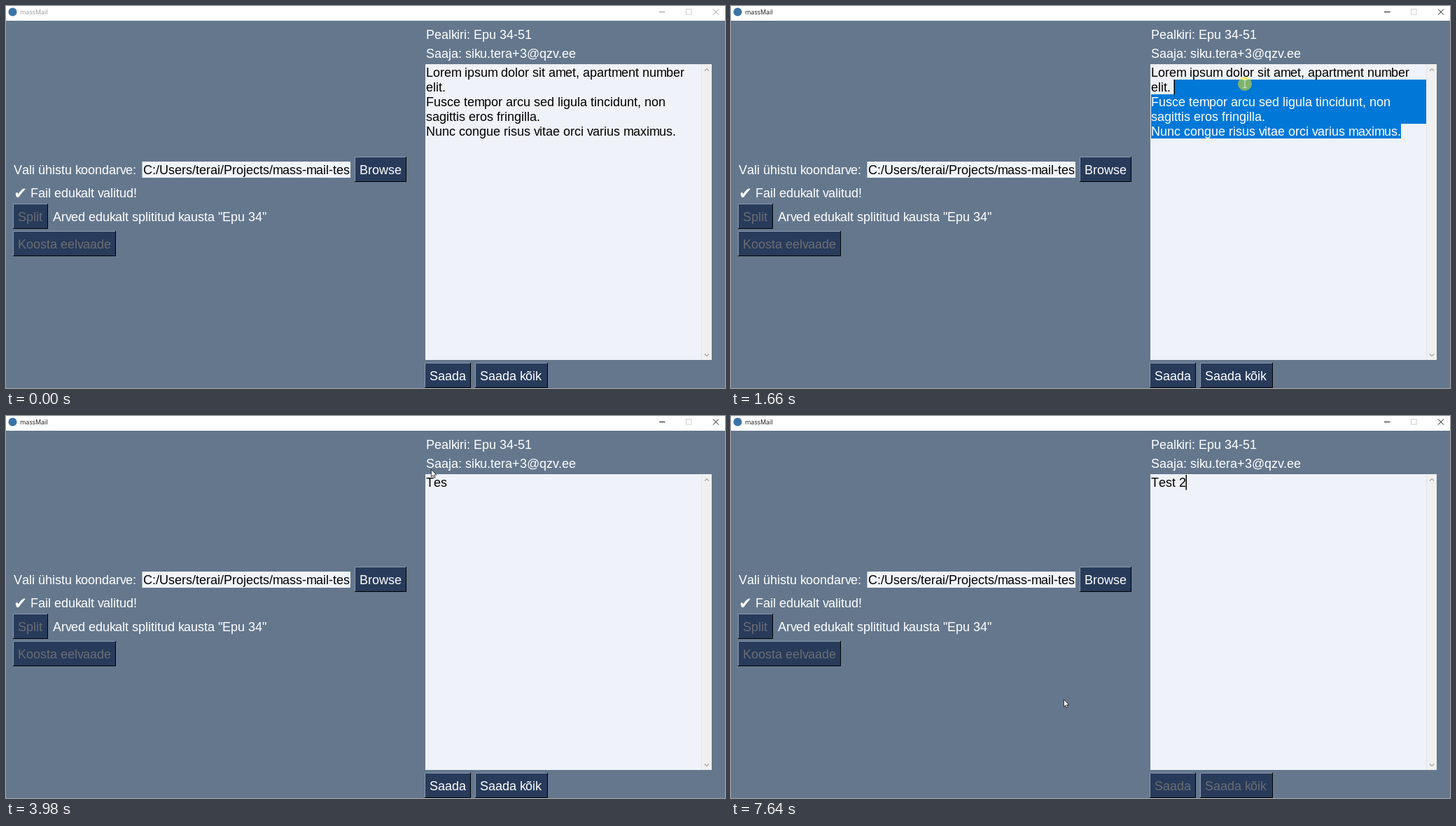
These frames come from a looping animation (1027x545 px, 8000 ms). An HTML page:

```html
<!DOCTYPE html>
<html lang="et">
<head>
<meta charset="utf-8">
<title>massMail</title>
<style>
  html, body { margin: 0; width: 100%; height: 100%; overflow: hidden; background: #64778d; }
  svg { display: block; }
  text { font: 18px "Liberation Sans", Arial, sans-serif; font-kerning: none; white-space: pre; fill: #fff; }
  .dark text, text.dark { fill: #000; }
  .dark .picked { fill: #fff; }
  .off text { fill: #6b6d72; }
  .title { font: 9px "Open Sans", sans-serif; }
  .tick { font: 23px "DejaVu Sans", sans-serif; }
  .sunk .hi { stroke: #000; }
  .sunk .lo { stroke: #8c9ab0; }
  path { fill: none; }
</style>
</head>
<body>
<svg id="stage" width="1027" height="545" viewBox="0 0 1027 545">
  <rect width="1027" height="545" fill="#64778d"/>
  <rect width="1027" height="21" fill="#fff"/>
  <circle cx="9.5" cy="8.5" r="6" fill="#3b73a6"/>
  <text id="title" class="title" x="20" y="12">massMail</text>
  <path id="minimize" d="M933 8.5h8.5"/>
  <rect x="971.5" y="4.5" width="7.5" height="7.5" fill="none" stroke="#d0d0d0"/>
  <path id="close" d="M1010 4.5l8 8m0-8l-8 8"/>

  <text x="11" y="239.5">Vali ühistu koondarve:</text>
  <rect x="194.5" y="222" width="297.5" height="23" fill="#f0f3f8"/>
  <text class="dark" x="196" y="239.5">C:/Users/terai/Projects/mass-mail-tes</text>
  <text class="tick" x="11" y="275">✔</text>
  <text x="35" y="273">Fail edukalt valitud!</text>
  <text x="67" y="306.5">Arved edukalt splititud kausta "Epu 34"</text>
  <text x="600" y="46.5">Pealkiri: Epu 34-51</text>
  <text x="600" y="74">Saaja: siku.tera+3@qzv.ee</text>
  <g id="buttons"></g>

  <rect x="599" y="83" width="409" height="422" fill="#eff2f8"/>
  <rect x="993" y="83" width="15" height="422" fill="#f0f0f0"/>
  <path d="M993.5 83v422" stroke="#e2e4e8"/>
  <path d="M998 92.5l3-3 3 3M998 496.5l3 3 3-3" stroke="#a3a3a3" stroke-width="1.2"/>
  <g id="marks" fill="#0078d7" shape-rendering="crispEdges"></g>
  <g id="lines" class="dark"></g>
  <rect id="caret" width="1.5" height="21.5"/>

  <g id="pointer">
    <circle id="press" r="10" fill="#ffee00" fill-opacity=".5"/>
    <path id="beam" d="M-2.5 -5.5h2l.5 .5.5-.5h2M0 -5v10M-2.5 5.5h2l.5-.5.5.5h2"/>
    <path id="arrow" d="M.4 .4v10.4l2.4-2.2 1.7 3.7 1.7-.8-1.7-3.5h3.4z"
          style="fill:#fff" stroke="#111" stroke-width=".8"/>
  </g>
</svg>
<script>
const LOOP = 8000, LEFT = 600, TOP = 84, LINE = 21, RIGHT = 993;
const $ = id => document.getElementById(id);
const show = (el, on) => el.setAttribute('visibility', on ? 'visible' : 'hidden');

function place(el, attrs) {
  for (const k in attrs) el.setAttribute(k, attrs[k]);
}

const LETTER = [
  'Lorem ipsum dolor sit amet, apartment number',
  'elit. ',
  'Fusce tempor arcu sed ligula tincidunt, non',
  'sagittis eros fringilla.',
  'Nunc congue risus vitae orci varius maximus.'
];

// Hinted type: every letter advances by whole pixels, and m, k, v are set tight.
const pen = document.createElement('canvas').getContext('2d');
pen.font = '180px "Liberation Sans", Arial, sans-serif';
const advance = ch => Math.round(pen.measureText(ch).width / 10) - /[mkv]/.test(ch);
const textEnd = (str, x = LEFT) => [...str].reduce((sum, ch) => sum + advance(ch), x);

function spaceOut(el, x) {
  const str = el.textContent;
  place(el, { x: [...str].map((_, i) => textEnd(str.slice(0, i), x)).join(' ') });
}

// label, x, y, width
const BUTTONS = [
  ['Browse', 498, 215, 74], ['Split', 10, 282, 50], ['Koosta eelvaade', 10, 321, 147],
  ['Saada', 598, 509, 66], ['Saada kõik', 670, 509, 104]
];
$('buttons').innerHTML = BUTTONS.map(([label, x, y, w]) =>
  `<g transform="translate(${x} ${y})"><rect width="${w}" height="36" fill="#283b5b"/>
   <path class="hi" stroke="#8c9ab0" d="M.5 36V.5H${w}"/>
   <path class="lo" stroke="#000" d="M0 35.5H${w - .5}V0"/>
   <text x="7" y="24.5">${label}</text></g>`).join('');
const [, split, preview, send, sendAll] = $('buttons').children;
split.classList.add('off');
preview.classList.add('off');

document.querySelectorAll('text:not(.title)').forEach(el => spaceOut(el, +el.getAttribute('x')));

$('lines').innerHTML = LETTER.map((_, i) =>
  `<text y="${TOP + 17 + i * LINE}"><tspan></tspan><tspan class="picked"></tspan></text>`).join('');
$('marks').innerHTML = '<rect/>'.repeat(LETTER.length);

// Changes of state; each one is merged into those before it.
const EVENTS = [
  [0, { text: LETTER, at: null, picking: false, caret: false, active: false,
        press: false, sunk: false, sent: false }],
  [1350, { active: true, press: true, caret: true, at: [4, 44] }],
  [1490, { picking: true, at: [3, 24] }],
  [1570, { at: [2, 27] }],
  [1660, { at: [1, 6] }],
  [1740, { at: [0, 6] }],
  [1810, { at: [0, 1] }],
  [1980, { press: false }],
  [2060, { caret: false }],
  [2290, { caret: true }],
  [2820, { text: ['L'], picking: false, at: null }],
  [2910, { caret: false }],
  [3060, { text: [''] }],
  [3140, { caret: true }],
  [3450, { text: ['T'] }],
  [3750, { text: ['Te'], caret: false }],
  [3980, { text: ['Tes'] }],
  [4070, { text: ['Test'], caret: true }],
  [4550, { text: ['Test '] }],
  [4700, { caret: false }],
  [4930, { caret: true }],
  [5030, { text: ['Test 2'] }],
  [5560, { caret: false }],
  [5880, { caret: true }],
  [6480, { caret: false }],
  [6790, { caret: true }],
  [6940, { press: true, sunk: true }],
  [7030, { press: false, sunk: false, sent: true }],
  [7410, { caret: false }],
  [7640, { caret: true }]
];

// Pointer moves: first step, last step, number of steps, evenly spaced points.
const MOVES = [
  [480, 1260, 11, [[922, 487], [934, 390], [966, 262], [958, 206], [957, 186], [956, 181]]],
  [1350, 1350, 1, [[956, 179]]],
  [1490, 1810, 5, [[905, 158], [822, 135], [734, 111], [655, 84], [608, 66]]],
  [2060, 2060, 1, [[607, 66]]],
  [2290, 2370, 2, [[607, 71], [607, 76]]],
  [5560, 5560, 1, [[616, 78]]],
  [5880, 6630, 11, [[618, 92], [634, 190], [666, 350], [694, 470], [706, 525]]],
  [6730, 6790, 2, [[707, 529], [708, 533]]],
  [7260, 7640, 6, [[690, 520], [650, 492], [590, 460], [530, 430], [492, 412], [475, 404]]]
];

function stateAt(t) {
  return Object.assign({}, ...EVENTS.filter(e => e[0] <= t).map(e => e[1]));
}

function pointerAt(t) {
  const move = MOVES.filter(m => m[0] <= t).pop();
  if (!move) return null;
  const [from, to, count, pts] = move;
  if (count === 1) return pts[0];
  const step = Math.min(count - 1, Math.floor((t - from) / (to - from) * (count - 1) + .15));
  const u = step / (count - 1) * (pts.length - 1);
  const i = Math.min(Math.floor(u), pts.length - 2);
  return pts[i].map((v, k) => v + (pts[i + 1][k] - v) * (u - i));
}

function drawText(s) {
  const [row, col] = s.at || [0, s.text[0].length];
  LETTER.forEach((_, i) => {
    const str = s.text[i] || '';
    const cut = !s.picking || i < row ? str.length : i === row ? col : 0;
    const line = $('lines').children[i];
    line.children[0].textContent = str.slice(0, cut);
    line.children[1].textContent = str.slice(cut);
    spaceOut(line, LEFT);
    const x = textEnd(str.slice(0, cut));
    const end = i === s.text.length - 1 ? textEnd(str) : RIGHT;
    place($('marks').children[i], {
      x, y: TOP + i * LINE, height: LINE, width: s.picking && i >= row ? end - x : 0
    });
  });
  place($('caret'), { x: textEnd(s.text[row].slice(0, col)) - .5, y: TOP + row * LINE });
  show($('caret'), s.caret);
}

function drawPointer(s, pos) {
  const [x, y] = pos || [0, 0];
  const inBox = x > 599 && x < RIGHT && y > 84 && y < 505;
  const beam = inBox || (s.press && !s.sunk);
  place($('pointer'), { transform: `translate(${x} ${y})` });
  place($('beam'), { stroke: s.picking ? '#e8efe0' : '#333' });
  show($('press'), pos && s.press);
  show($('beam'), pos && beam);
  show($('arrow'), pos && !beam);
}

function draw(t) {
  const s = stateAt(t);
  const ink = s.active ? '#111' : '#949494';
  $('title').style.fill = ink;
  place($('minimize'), { stroke: ink });
  place($('close'), { stroke: ink });
  send.classList.toggle('off', s.sent);
  sendAll.classList.toggle('off', s.sent);
  sendAll.classList.toggle('sunk', s.sunk);
  drawText(s);
  drawPointer(s, pointerAt(t));
}

const start = performance.now();
function tick() {
  draw((performance.now() - start) % LOOP);
  requestAnimationFrame(tick);
}
tick();
</script>
</body>
</html>
```
